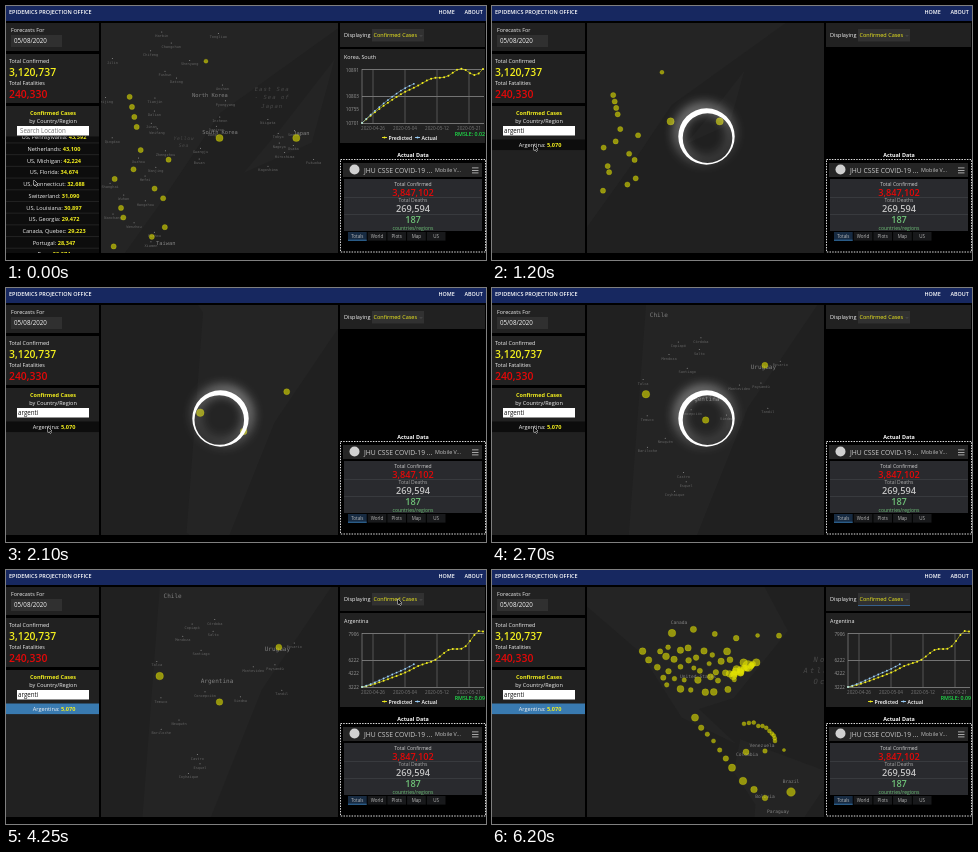
Write an HTML page with a canvas that moves like this. It is 480 by 254 pixels and loops after 6.25 s.

```html
<!DOCTYPE html>
<html lang="en">
<head>
<meta charset="utf-8">
<title>Forecast dashboard</title>
<style>
html, body { margin: 0; width: 100%; height: 100%; overflow: hidden; background: #000; }
canvas { display: block; width: 480px; height: 254px; }
</style>
</head>
<body>
<canvas id="stage" width="480" height="254"></canvas>
<script>
const c = document.getElementById('stage').getContext('2d');
const LOOP = 6250, YELLOW = '#f4f01e', RED = '#e50808', PANEL = '#212121', WHITE = '#f2f2f2';
const UI = '"Open Sans", "Noto Sans", sans-serif', MONO = '"DejaVu Sans Mono", monospace';

// timeline
const TYPE = 450, FLY = 980, FLY_MS = 1780, LOADED = 3600, TO_FATAL = 4400,
      OUT = 4650, IN = 5150, TO_CASES = 5650;
// time, x, y; the cursor rests 250 ms before each move ends
const cursorStops = [[0, 28, 174], [420, 40, 124], [900, 42, 139], [4250, 392, 29],
  [4640, 298, 105], [5600, 385, 29], [6050, 178, 76]];

const clamp = (v, a, b) => Math.min(b, Math.max(a, v));
const lerp = (a, b, p) => a + (b - a) * p;
const span = (t, start, ms) => clamp((t - start) / ms, 0, 1);

let seed = 41;
const rand = () => (seed = (seed * 16807) % 2147483647) / 2147483647;
const jitter = d => (rand() + rand() - 1) * d;

function box(x, y, w, h, color) {
  c.fillStyle = color;
  c.fillRect(x, y, w, h);
}
function text(str, x, y, size, color, align = 'left', weight = 500, font = UI) {
  c.font = `${weight} ${size}px ${font}`;
  c.textAlign = align;
  c.fillStyle = color;
  c.fillText(str, x, y);
}
function disc(x, y, r, color) {
  c.fillStyle = color;
  c.beginPath();
  c.arc(x, y, r, 0, 7);
  c.fill();
}
function line(pts, color, width) {
  c.strokeStyle = color;
  c.lineWidth = width;
  c.beginPath();
  pts.forEach(p => c.lineTo(...p));
  c.stroke();
}

// ---- map: views hold centre longitude, centre mercator degree, pixels per degree
const CX = 213.5, CY = 132, TURNS = [-360, 0, 360];
const asia = { lon: 127.8, m: 38.6, k: 7.55 }, pacific = { lon: 225.5, m: -8.3, k: 2.5 },
      south = { lon: 296.4, m: -41.65, k: 7.6 }, americas = { lon: 266, m: 27.2, k: 2.17 },
      world = { lon: 173, m: 0, k: .64 };
const place = (v, x, y) => [v.lon + (x - CX) / v.k, v.m - (y - CY) / v.k];

// rough continents: longitude, mercator degree
const land = [
  [[-10, 40], [5, 60], [25, 105], [100, 115], [190, 90], [160, 65], [128, 42], [120, 30], [105, 9], [92, 23], [78, 8], [45, 13], [30, 38]],
  [[-15, 28], [10, 41], [32, 33], [51, 12], [40, -15], [20, -37], [9, 4], [-8, 5]],
  [[-168, 88], [-80, 105], [-56, 60], [-81, 29], [-97, 24], [-80, 8], [-105, 20], [-124, 50]],
  [[-78, 10], [-35, -6], [-58, -40], [-68, -65], [-74, -60], [-71, -20], [-81, -5]],
  [[114, -24], [142, -11], [153, -30], [140, -43], [115, -37]],
  [[131, 34], [140, 38], [143, 49], [136, 40]]];

// ---- case markers: longitude, mercator degree, radius
const dots = [];
const addDot = (view, x, y, r) => dots.push([...place(view, x, y), r]);
const chain = (n, at) => { for (let i = 0; i < n; i++) addDot(...at(i / (n - 1))); };
function scatter(lon, m, dx, dy, n, r) {
  for (let i = 0; i < n; i++) dots.push([lon + jitter(dx), m + jitter(dy), r * (.5 + rand() * .7)]);
}
// states: a loose grid leaning east, then a dense eastern seaboard
for (let row = 0; row < 5; row++)
  for (let x = 153 + row * 6; x < 243; x += 11.5)
    addDot(americas, x + jitter(4), 78 + row * 9.5 + (x - 153) * .06 + jitter(4), 2.2 + rand() * 1.4);
chain(18, p => [americas, 238 + 24 * p + jitter(4), 107 - 15 * p + jitter(5), 2.4 + rand() * 1.4]);
addDot(americas, 256, 96, 5.5);
chain(6, p => [americas, 180 + 107 * p, 64 + jitter(8), 2 + rand() * 1.8]);
// Central America, the Caribbean arc, South America
chain(7, p => [americas, 203 + 37 * p, 148 + 48 * p + jitter(4), 3.6 - 6 * p * (1 - p)]);
chain(11, p => [americas, 252 + 31 * Math.sin(p * 1.6), 170 - 17 * Math.cos(p * 1.6) + jitter(2), 2]);
chain(3, p => [americas, 251 + 22 * p, 211 + 17 * p, 3.8 - p]);
chain(3, p => [americas, 254 + 38 * p, 182 - 2 * p, 3 - 1.4 * p]);
addDot(americas, 299, 222, 4.3);
// East Asia
chain(2, p => [asia, 213.5 + 76.5 * p, 132, 3.6]);
chain(4, p => [asia, 124 + 7 * p, 91 + 30 * p, 2.6]);
chain(11, p => [asia, 135 + 28 * Math.sin(p * 17), 144 + 96 * p, 2.6]);
addDot(asia, 200, 55.5, 2);
// South American capitals and Pacific islands
addDot(south, 153.5, 106, 3.8);
addDot(south, 213.5, 132, 3.3);
addDot(south, 273, 77, 3);
chain(2, p => [pacific, 96 + 80 * p, 156, 1.5]);
addDot(pacific, 156, 60, 2.5);
// rest of the world
scatter(8, 53, 20, 14, 55, 4);
scatter(48, 36, 32, 16, 40, 3.2);
scatter(90, 24, 18, 18, 24, 3);
scatter(15, 2, 28, 26, 28, 2.4);
scatter(147, -35, 6, 6, 6, 2.5);

// ---- map labels
const SEA = '#484848', LAND = '#808080', labels = [];
function countries(view, size, places) {
  for (const name in places) labels.push({ view, str: name, x: places[name][0], y: places[name][1], size, color: LAND, gap: 0 });
}
function sea(view, x, y, size, gap, ...words) {
  words.forEach((str, i) => labels.push({ view, str, x, y: y + i * size * 1.5, size, color: SEA, gap }));
}
function towns(view, x, y, w, h, names) {
  names.split(' ').forEach((str, i, all) => labels.push({ view, str, x: x + w * rand(),
    y: y + h * (i + rand()) / all.length, size: 3.6, color: '#626262', gap: 0, town: true }));
}
countries(asia, 5.4, { 'North Korea': [204, 91], 'South Korea': [214, 128], Japan: [295, 129], Taiwan: [160, 239] });
countries(south, 6, { Chile: [166.5, 28], Uruguay: [271.5, 80.5], Argentina: [211, 112.5] });
countries(americas, 4.6, { Canada: [187, 54], 'United States': [206, 108], Venezuela: [270, 177], Colombia: [255, 186],
  Brazil: [299, 213], Bolivia: [273, 228], Paraguay: [286, 243] });
sea(asia, 266, 85, 5.6, 1, 'East Sea', '- Sea of', 'Japan');
sea(asia, 178, 134, 4.8, .6, 'Yellow', 'Sea');
sea(pacific, 146, 20, 6.6, 1.4, 'Pacific', 'Ocean');
sea(pacific, 185, 191, 6.6, 1.4, 'South', 'Pacific', 'Ocean');
sea(americas, 338, 92, 7.2, 2.3, 'North', 'Atlantic', 'Ocean');
towns(asia, 105, 25, 115, 60, 'Harbin Tongliao Changchun Chifeng Jilin Shenyang Fushun Datong Anshan');
towns(asia, 100, 88, 65, 155, 'Beijing Tianjin Dalian Jinan Weifang Qingdao Zhengzhou Xuzhou Nanjing Hefei Shanghai Wuhan Hangzhou Nanchang Wenzhou Fuzhou Xiamen');
towns(asia, 190, 98, 35, 60, 'Pyongyang Incheon Daejeon Daegu Gwangju Busan');
towns(asia, 235, 118, 85, 50, 'Niigata Sendai Tokyo Nagoya Osaka Hiroshima Fukuoka Kagoshima');
towns(south, 145, 48, 60, 175, 'Copiapó Mendoza Santiago Talca Concepción Temuco Neuquén Bariloche Castro Esquel Coyhaique');
towns(south, 205, 50, 90, 90, 'Córdoba Salto Rosario Paysandú Montevideo Tandil Viedma');

function bezierEase(x) {
  let a = 0, b = 1, p;
  for (let i = 0; i < 24; i++) {
    p = (a + b) / 2;
    if (.75 * p * (1 - p) + p ** 3 < x) a = p; else b = p;
  }
  return .3 * (1 - p) ** 2 * p + 3 * (1 - p) * p * p + p ** 3;
}
// zooming about a fixed point moves the centre linearly in 1/k
function zoom(a, b, p) {
  const k = a.k * (b.k / a.k) ** p, s = (1 / k - 1 / a.k) / (1 / b.k - 1 / a.k);
  const limit = Math.max(0, 180 - 115 / k);
  return { k, lon: lerp(a.lon, b.lon, s), m: clamp(lerp(a.m, b.m, s), -limit, limit) };
}
function viewAt(t) {
  if (t >= IN) return zoom(world, americas, span(t, IN, 250));
  if (t >= OUT) return zoom(south, { ...world, m: -77 }, span(t, OUT, 300));
  const R = 1.811, x = R * (2 * bezierEase(span(t, FLY, FLY_MS)) - 1);
  const p = (Math.tanh(x) / Math.tanh(R) + 1) / 2;
  return { lon: lerp(asia.lon, south.lon, p), m: lerp(asia.m, south.m, p), k: 7.58 * Math.cosh(x) / Math.cosh(R) };
}

function drawLoader(t) {
  const a = Math.PI * (.25 + 2 * (t - 1550) / 750), ux = Math.cos(a), uy = Math.sin(a);
  c.shadowColor = 'rgba(255,255,255,.8)';
  c.shadowBlur = 12;
  c.shadowOffsetX = ux * 4;
  c.shadowOffsetY = uy * 4;
  c.fillStyle = '#fff';
  c.beginPath();
  c.arc(214.5, 130.5, 28.2, 0, 7);
  c.closePath();
  c.moveTo(239.3 - ux * 1.9, 130.5 - uy * 1.9);
  c.arc(214.5 - ux * 1.9, 130.5 - uy * 1.9, 24.8, 0, 7);
  c.fill('evenodd');
}
function drawMap(t, fatal) {
  const v = viewAt(t), scale = clamp(.6 + .33 * Math.log(v.k / .64), .6, 1);
  const at = ([lon, m], turn) => [CX + (lon + turn - v.lon) * v.k, CY - (m - v.m) * v.k];
  c.save();
  c.beginPath();
  c.rect(95, 17, 237, 230);
  c.clip();
  box(95, 17, 237, 230, '#202020');
  for (const turn of TURNS) for (const shape of land) {
    c.fillStyle = '#242424';
    c.beginPath();
    shape.forEach(p => c.lineTo(...at(p, turn)));
    c.fill();
  }
  for (const { view, str, x, y, size, color, gap, town } of labels) {
    if (v.k < view.k * .75 || v.k > view.k * 1.6) continue;
    for (const turn of TURNS) {
      const [lx, ly] = at(place(view, x, y), turn);
      if (lx < 40 || lx > 390) continue;
      c.letterSpacing = gap + 'px';
      text(str, lx, ly, size, color, 'center', gap ? 'italic 400' : 400, MONO);
      if (town) disc(lx, ly - 5, .5, '#999');
    }
  }
  c.letterSpacing = '0px';
  for (const d of dots) for (const turn of TURNS) {
    const [x, y] = at(d, turn);
    if (x > 88 && x < 340) {
      disc(x, y, d[2] * scale, fatal ? 'rgba(230,0,0,.7)' : 'rgba(225,225,0,.6)');
      c.strokeStyle = fatal ? 'rgba(240,0,0,.5)' : 'rgba(235,235,10,.4)';
      c.lineWidth = .6;
      c.stroke();
    }
  }
  if (t >= FLY && t < LOADED) drawLoader(t);
  c.restore();
}

// ---- left column
const regions = [['Spain', '221,447'], ['Italy', '215,858'], ['US, Pennsylvania', '43,592'], ['Netherlands', '43,100'],
  ['US, Michigan', '42,224'], ['US, Florida', '34,674'], ['US, Connecticut', '32,688'], ['Switzerland', '31,090'],
  ['US, Louisiana', '30,897'], ['US, Georgia', '29,472'], ['Canada, Quebec', '29,223'], ['Portugal', '28,347'],
  ['Peru', '28,074'], ['US, Maryland', '27,117'], ['Denmark', '10,083'], ['US, Arizona', '9,945'], ['Argentina', '5,070']];

function drawRow(name, value, y, color, selected) {
  box(0, y - 7.5, 93, 10.6, selected ? '#397ab0' : '#0d0d0d');
  name += ': ';
  c.font = `500 5.6px ${UI}`;
  const w = c.measureText(name).width;
  c.font = `700 5.6px ${UI}`;
  const x = 48 - (w + c.measureText(value).width) / 2;
  text(name, x, y, 5.6, WHITE);
  text(value, x + w, y, 5.6, color, 'left', 700);
}
function drawLeft(t, fatal) {
  const query = 'argenti'.slice(0, clamp(Math.floor((t - TYPE) / 50) + 1, 0, 7)), color = fatal ? RED : YELLOW;
  box(0, 17, 93, 28, PANEL);
  text('Forecasts For', 5, 26, 5.4, WHITE);
  box(5, 29, 51, 12, '#303030');
  text('05/08/2020', 8, 37.3, 6.2, WHITE);
  box(0, 48, 93, 49, PANEL);
  text('Total Confirmed', 3, 57, 5.4, WHITE);
  text('3,120,737', 3, 70, 10.4, YELLOW, 'left', 600);
  text('Total Fatalities', 3, 79, 5.4, WHITE);
  text('240,330', 3, 92, 10.4, RED, 'left', 600);
  box(0, 100, 93, 147, PANEL);
  c.save();
  c.beginPath();
  c.rect(0, 130.5, 93, 116.5);
  c.clip();
  regions.filter(r => r[0].toLowerCase().includes(query)).forEach(([name, value], i) => {
    const y = query ? 141 + i * 11.7 : 145 + (i - 3) * 11.7;
    drawRow(name, fatal ? '264' : value, y, color, t >= LOADED);
  });
  c.restore();
  text(fatal ? 'Fatalities' : 'Confirmed Cases', 47, 109, 5.5, color, 'center', 700);
  text('by Country/Region', 47, 117, 5.5, WHITE, 'center');
  box(11, 120, 72, 9.5, '#fff');
  text(query || 'Search Location', query ? 12 : 14, 127, 6.2, query ? '#111' : '#777');
  if (query && t < FLY) box(13 + c.measureText(query).width, 121.5, .6, 6.5, '#111');
}

// ---- right column: each curve is a trend plus a weekly dip that grows with time
const BLUE = '#9fd4ff';
const charts = {
  korea: { title: 'Korea, South', color: YELLOW, error: '0.02', ticks: ['10891', '10803', '10755', '10701'],
    trend: p => 1 - (1 - p) ** 2, dip: .68, lead: 4 },
  deaths: { title: 'Argentina', color: '#ff3b3b', error: '0.08', ticks: ['1101', '867', '407', '157'],
    trend: p => .12 * p + .88 * p ** 4.5, dip: .885, lead: 0 },
  cases: { title: 'Argentina', color: YELLOW, error: '0.09', ticks: ['7906', '6222', '4222', '3222'],
    trend: p => p ** 1.25, dip: .83, lead: 4 }
};
function drawChart({ title, color, error, ticks, trend, dip, lead }) {
  const LEFT = 356, W = 121;
  const point = p => [LEFT + W * p, 117 - 53 * trend(p) + 6 * p ** 3 * Math.cos((p - dip) * 8 * Math.PI)];
  box(334, 43, 145, 94, PANEL);
  text(title, 338, 53, 5.4, WHITE);
  ticks.forEach((s, i) => text(s, 353, [66, 92, 105, 119][i], 4.6, '#999', 'right'));
  for (const y of [63.5, 90.5, 117.5]) line([[LEFT, y], [478, y]], '#888', .8);
  ['2020-04-26', '2020-05-04', '2020-05-12', '2020-05-21'].forEach((s, i) => {
    const x = 367 + i * 32;
    line([[x, 63], [x, 117]], '#777', .6);
    text(s, x, 123.5, 4.6, '#777', 'center');
  });
  line([[LEFT, 63], [LEFT, 117]], '#999', .6);
  const predicted = Array.from({ length: 29 }, (_, i) => point(i / 28));
  const actual = predicted.slice(0, 13).map(([x, y], i) => [x, y - lead * Math.sin(i / 8)]);
  line(predicted, color, .5);
  predicted.forEach(p => disc(...p, 1, color));
  line(actual, BLUE, .5);
  actual.forEach(p => disc(...p, .9, BLUE));
  [['Predicted', 376, color], ['Actual', 409, BLUE]].forEach(([s, x, key]) => {
    line([[x, 131.5], [x + 5, 131.5]], key, .9);
    disc(x + 2.5, 131.5, 1, key);
    text(s, x + 6.5, 133.5, 5.2, '#fff', 'left', 600);
  });
  text('RMSLE: ' + error, 479, 130, 5.3, '#1fe04a', 'right', 600);
}
function drawDashboard() {
  text('Actual Data', 407, 151, 5.4, '#fff', 'center', 700);
  c.strokeStyle = '#ddd';
  c.lineWidth = 1;
  c.setLineDash([1.5, 1.2]);
  c.strokeRect(334.5, 153.5, 145, 92.5);
  c.setLineDash([]);
  box(337, 157, 139, 14, '#252525');
  disc(348.5, 163.5, 5, '#d0d0d0');
  text('JHU CSSE COVID-19 ...', 358, 166.8, 6.8, '#c8c8c8');
  text('Mobile V...', 429, 166.3, 5.4, '#c0c0c0');
  for (const y of [161.5, 164, 166.5]) box(466, y, 6.5, .8, '#c8c8c8');
  box(338, 173, 138, 52, '#292a2e');
  for (const y of [191, 208]) box(338, y, 138, .7, '#404145');
  const stat = (label, labelY, value, valueY, labelColor, color) => {
    text(label, 407, labelY, 5, labelColor, 'center');
    text(value, 407, valueY, 9.2, color, 'center', 600);
  };
  stat('Total Confirmed', 180, '3,847,102', 189.6, '#d0d0d0', RED);
  stat('Total Deaths', 196, '269,594', 206.2, '#aaa', '#c4c4c4');
  stat('countries/regions', 224, '187', 217.3, '#6fc178', '#6fc178');
  ['Totals', 'World', 'Plots', 'Map', 'US'].forEach((s, i) => {
    const x = 342 + i * 19.7;
    box(x, 226, 18.7, 8.6, i ? '#18191b' : '#172b42');
    if (!i) box(x, 233.8, 18.7, .8, '#3d86c6');
    text(s, x + 9.3, 232.2, 4.5, '#bbb', 'center');
  });
}
function drawRight(t, fatal) {
  box(334, 17, 145, 24, PANEL);
  text('Displaying', 338, 31, 5.5, WHITE);
  box(366, 23, 52, 12.5, '#313131');
  if (t >= TO_FATAL) box(366, 35, 52, .8, '#3a6ea5');
  text(fatal ? 'Fatalities' : 'Confirmed Cases', 367.5, 31, 5.5, fatal ? RED : YELLOW);
  line([[414, 29.3], [415, 30.3], [416, 29.3]], '#777', .5);
  if (t < FLY) drawChart(charts.korea);
  else if (t >= LOADED) drawChart(fatal ? charts.deaths : charts.cases);
  drawDashboard();
}

function drawCursor(t) {
  if (t >= 6050 || (t > 470 && t < 850)) return;
  const i = cursorStops.findIndex(s => s[0] > t), [, ax, ay] = cursorStops[i - 1], [end, bx, by] = cursorStops[i];
  const p = span(t, end - 250, 250), s = p * p * (3 - 2 * p);
  c.save();
  c.translate(lerp(ax, bx, s), lerp(ay, by, s));
  c.beginPath();
  for (const [x, y] of [[0, 0], [0, 5.4], [1.3, 4.3], [2.2, 6.2], [3.1, 5.8], [2.3, 4], [3.9, 3.9]]) c.lineTo(x, y);
  c.closePath();
  c.strokeStyle = '#eee';
  c.lineWidth = 1;
  c.stroke();
  c.fillStyle = '#111';
  c.fill();
  c.restore();
}

function frame(now) {
  const t = now % LOOP, fatal = t >= TO_FATAL && t < TO_CASES;
  box(0, 0, 480, 254, '#000');
  box(0, 0, 480, 15, '#172860');
  text('EPIDEMICS PROJECTION OFFICE', 3, 8.3, 5.5, '#fff', 'left', 600);
  text('HOME', 432.5, 8.3, 5.4, '#fff', 'left', 600);
  text('ABOUT', 458.5, 8.3, 5.4, '#fff', 'left', 600);
  drawLeft(t, fatal);
  drawMap(t, fatal);
  drawRight(t, fatal);
  drawCursor(t);
  requestAnimationFrame(frame);
}
requestAnimationFrame(frame);
</script>
</body>
</html>
```
